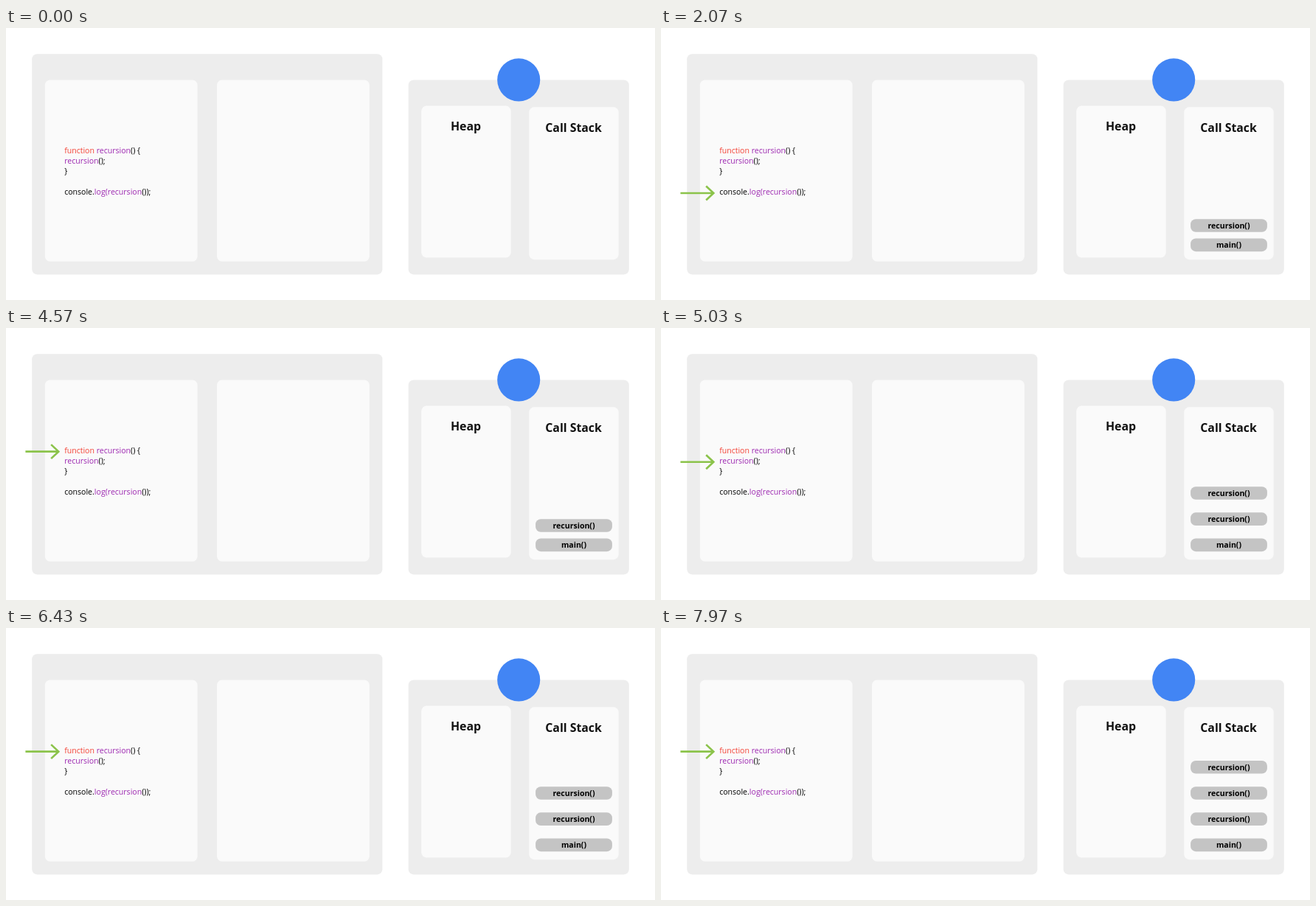
Recreate the animation shown at these times as an HTML page. Size 880 by 369 pixels, loop 8 s.

```html
<!DOCTYPE html>
<html lang="en">
<head>
<meta charset="utf-8">
<title>Recursion and the call stack</title>
<style>
  html, body { margin: 0; width: 100%; height: 100%; overflow: hidden; background: #fff; }
  svg { display: block; width: 880px; height: 369px; font: 12px "Open Sans", sans-serif; }
  .panel { fill: #ededed; }
  .card { fill: #fafafa; }
  .title { font-size: 18px; font-weight: 700; fill: #111; text-anchor: middle; }
  .code { white-space: pre; }
  .keyword { fill: #f44336; }
  .name { fill: #9c27b0; }
  .call rect { fill: #c4c4c4; }
  .call text { font-weight: 700; text-anchor: middle; }
  #arrow { fill: none; stroke: #8bc34a; stroke-width: 3; }
</style>
</head>
<body>
<svg viewBox="0 0 880 369">
  <g transform="scale(.88)">
    <rect class="panel" x="40" y="40" width="540" height="340" rx="8"/>
    <rect class="card" x="60" y="80" width="235" height="280" rx="8"/>
    <rect class="card" x="325" y="80" width="235" height="280" rx="8"/>
    <rect class="panel" x="620" y="80" width="340" height="300" rx="8"/>
    <rect class="card" x="640" y="120" width="138" height="234" rx="8"/>
    <rect class="card" x="806" y="122" width="138" height="235" rx="8"/>
    <circle cx="790" cy="80" r="33" fill="#4285f4"/>
    <text class="title" x="708.5" y="158.5">Heap</text>
    <text class="title" x="874.5" y="160.5">Call Stack</text>
    <g class="code">
      <text x="90" y="193"><tspan class="keyword">function</tspan> <tspan class="name">recursion</tspan>() {</text>
      <text x="90" y="209">  <tspan class="name">recursion</tspan>();</text>
      <text x="90" y="225">}</text>
      <text x="90" y="257">console.<tspan class="name">log(recursion</tspan>());</text>
    </g>
    <path id="arrow" d="M30 0H81M69.5 -10.8L81 0L69.5 10.8"/>
    <g id="stack"></g>
  </g>
</svg>
<script>
  const LOOP = 8000;
  const LINE_HEIGHT = 16;
  const STACK_BOTTOM = 334.5;

  // Each step: start time, line the arrow points at, calls on the stack, gap between calls.
  const steps = [
    { at: 0, line: null, depth: 0, gap: 30 },
    { at: 1070, line: 0, depth: 1, gap: 30 },
    { at: 2070, line: 4, depth: 2, gap: 30 },
    { at: 3070, line: 0, depth: 2, gap: 30 },
    { at: 4800, line: 1, depth: 3, gap: 40 },
    { at: 5800, line: 0, depth: 3, gap: 40 },
    { at: 6750, line: 1, depth: 4, gap: 40 },
    { at: 7500, line: 0, depth: 4, gap: 40 }
  ];

  const arrow = document.getElementById("arrow");
  const stack = document.getElementById("stack");
  stack.innerHTML = ["main", "recursion", "recursion", "recursion"].map(name => `
    <g class="call">
      <rect x="816" y="-10" width="118" height="20" rx="8"/>
      <text x="875" y="4.5">${name}()</text>
    </g>`).join("");
  const calls = [...stack.children];

  const show = (element, visible, y) => {
    element.setAttribute("visibility", visible ? "visible" : "hidden");
    element.setAttribute("transform", `translate(0 ${y})`);
  };

  function draw(time) {
    const step = steps.findLast(s => s.at <= time);
    show(arrow, step.line !== null, 190.5 + step.line * LINE_HEIGHT);
    calls.forEach((call, i) => {
      // Only the first call sits closer while the stack is short.
      show(call, i < step.depth, STACK_BOTTOM - i * step.gap);
    });
  }

  const start = performance.now();
  function tick() {
    draw((performance.now() - start) % LOOP);
    requestAnimationFrame(tick);
  }
  tick();
</script>
</body>
</html>
```
